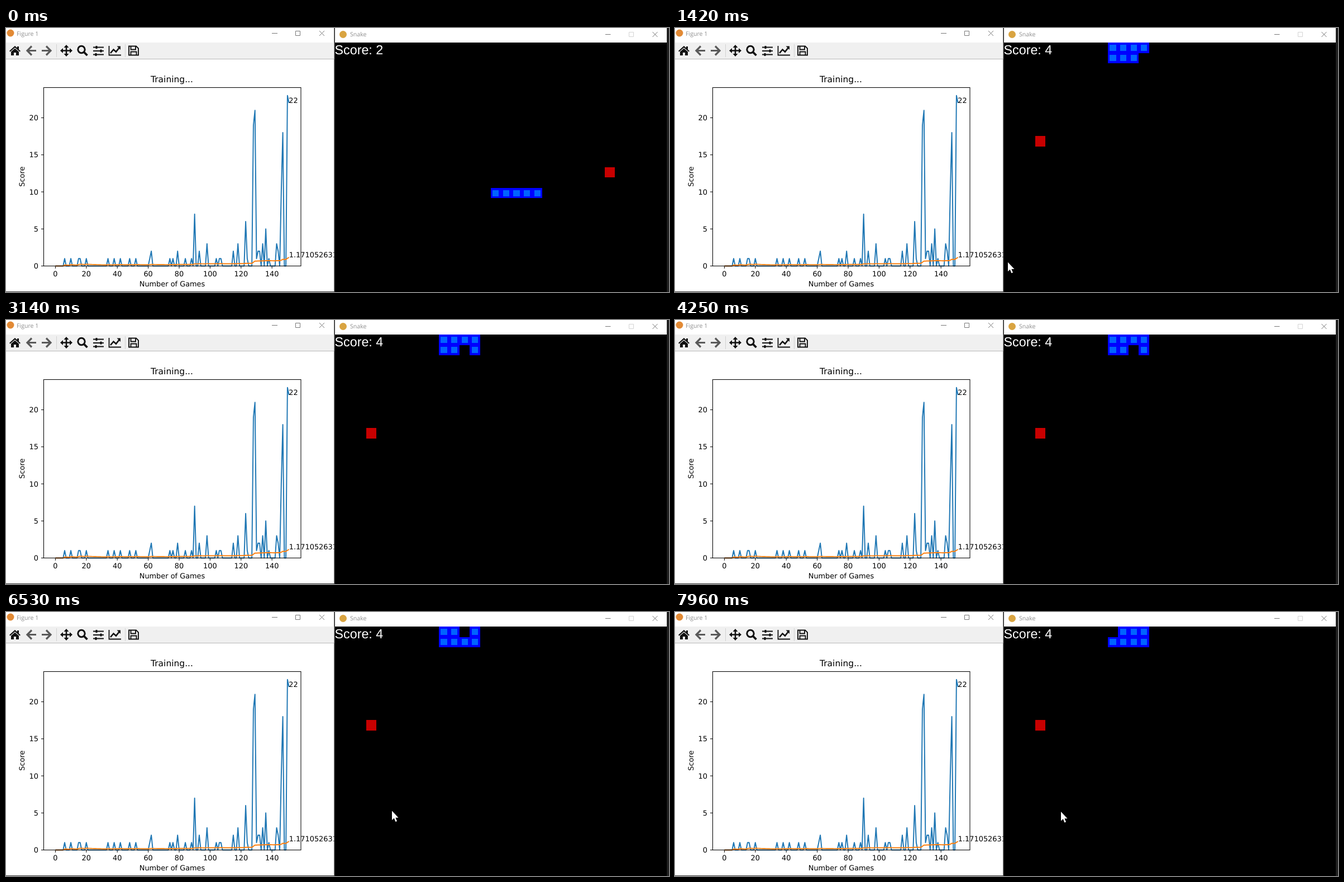
An HTML page for the animation above (7.99 s loop, 1187x472 px).

```html
<!DOCTYPE html>
<html lang="en">
<head>
<meta charset="utf-8">
<title>Snake training</title>
<style>
  html, body { margin: 0; width: 100%; height: 100%; overflow: hidden; background: #000; }
  svg { display: block; width: 1187px; height: 472px; }
  text { text-rendering: geometricPrecision; }
  .plot { font: 12.9px "DejaVu Sans", sans-serif; }
  .plot .title { font-size: 15.5px; }
  .bar { font: 10.6px "Open Sans", sans-serif; fill: #8f8f8f; }
  .score { font: 23.3px "Liberation Sans", Arial, sans-serif; fill: #fff; }
  .line { fill: none; stroke-width: 1.95; stroke-linejoin: round; }
  .axis { fill: none; stroke: #000; stroke-width: 1.04; }
  .button { fill: none; stroke: #777; }
  .icon { fill: none; stroke: #111; stroke-width: 2; }
  .mid { text-anchor: middle; }
  .end { text-anchor: end; }
</style>
</head>
<body>
<svg viewBox="0 0 1187 472">
  <!-- figure window -->
  <rect width="587.500" height="471" fill="#fff"/>
  <rect y="26" width="587.500" height="29" fill="#f0f0f0"/>
  <path d="M0 55.500H587.500" stroke="#b8b8b8"/>
  <path d="M0 471.500H588M588.300 0V472" stroke="#333"/>
  <circle cx="8" cy="9" r="6.500" fill="#e28a35"/>
  <text class="bar" x="19" y="13.700">Figure 1</text>
  <path class="button" d="M476 9.500h10M518.500 5.500h8v8h-8zM561 5l9 9m0-9l-9 9"/>

  <!-- toolbar -->
  <path d="M6 41L16 32L20 35.500V33H23V38.500L26 41L24.500 42.500L16 35L7.500 42.500ZM9 42.500L16 36.500L23 42.500V49H18V44H14V49H9Z" fill="#111"/>
  <g fill="none" stroke="#5a5a5a" stroke-width="3.200">
    <path d="M46 32.500L38 40.500L46 48.500M38.500 40.500H54"/>
    <path d="M72 32.500L80 40.500L72 48.500M79.500 40.500H64"/>
  </g>
  <path d="M90.500 29V52M213.500 29V52" stroke="#d2d2d2"/>
  <path class="icon" d="M108 33V48M100 40.500H116" style="stroke-width:2.6"/>
  <path d="M108 30l4.500 5h-9zM108 51l4.500-5h-9zM97 40.500l5-4.500v9zM119 40.500l-5-4.500v9z" fill="#111"/>
  <circle class="icon" cx="135" cy="38.500" r="6.200" style="stroke-width:3"/>
  <path class="icon" d="M139.500 43L145.500 49" style="stroke-width:3.8"/>
  <path class="icon" d="M156 34.500H175M156 41H175M156 47.500H175" style="stroke-width:1.8"/>
  <path class="icon" d="M162 32v5M170 38.500v5M161 45v5" style="stroke-width:3"/>
  <path class="icon" d="M184.500 32V48.500H206" style="stroke-width:1.8"/>
  <path class="icon" d="M187 45L192.500 38.500L197 42.500L203 35" style="stroke-width:2.6"/>
  <path d="M198.500 32.500H205V39z" fill="#111"/>
  <path class="icon" d="M220 32.500H233L237 36.500V48.500H220ZM223.500 33V38.500H232V33M223.500 48V42.500H233.500V48" style="stroke-width:1.9"/>

  <!-- chart -->
  <svg width="587.500" height="471">
    <g class="plot">
      <text class="title mid" x="297" y="97.200">Training...</text>
      <text class="mid" x="297.500" y="462.200">Number of Games</text>
      <text class="mid" transform="translate(33.300 265.700) rotate(-90)">Score</text>
      <g id="ticks"></g>
      <path id="scores" class="line" stroke="#1f77b4"/>
      <path id="means" class="line" stroke="#ff7f0e"/>
      <rect class="axis" x="67.500" y="106.500" width="460.500" height="319"/>
      <text x="506.300" y="133.700">22</text>
      <text x="506.800" y="409.800">1.1710526315789473</text>
    </g>
  </svg>

  <!-- game window -->
  <rect x="589" width="594" height="26" fill="#fff"/>
  <rect x="1183" width="4" height="472" fill="#202020"/>
  <circle cx="603.500" cy="11.500" r="6.500" fill="#d9a441"/>
  <text class="bar" x="616" y="15.200">Snake</text>
  <path class="button" d="M1073 11.500h9.500M1157.500 7l9 9m0-9l-9 9"/>
  <path class="button" d="M1115.500 7.500h8v8h-8z" style="stroke:#d4d4d4"/>
  <g shape-rendering="crispEdges">
    <path id="food" fill="#c80000"/>
    <path id="body" fill="#00f"/>
    <path id="inner" fill="#0064ff"/>
  </g>
  <text id="score" class="score" x="588.500" y="47.200"></text>
  <path id="cursor" d="M0 0V16.500L3.800 13L6.400 19.500L9 18.400L6.400 12.200H11.500Z" fill="#fff"/>
</svg>
<script>
const $ = id => document.getElementById(id);
const LOOP = 7990;

// ---- chart: single points recur at a few periods, the better games stand out
const GAMES = 152;
const periods = [[14, 6], [32, 10], [23, 15], [36, 16]];
const peaks = {
  62: 2, 79: 2, 90: 7, 93: 2, 98: 3, 115: 2, 118: 3, 123: 6, 128: 19, 129: 21,
  131: 2, 132: 2, 134: 3, 136: 5, 143: 3, 144: 2, 146: 10, 147: 18, 150: 23, 151: 22
};
const px = n => 88.4 + 2.77 * n;
const py = v => 425.5 - 13.25 * v;
const scores = [], means = [];
let sum = 0;
for (let n = 0; n < GAMES; n++) {
  const v = peaks[n] ?? +periods.some(([every, first]) => n % every === first);
  sum += v;
  scores.push([px(n), py(v)]);
  means.push([px(n), py(sum / (n + 1))]);
}
$('scores').setAttribute('d', 'M' + scores.join('L'));
$('means').setAttribute('d', 'M' + means.join('L'));

let ticks = '';
for (let n = 0; n <= 140; n += 20)
  ticks += `<path class="axis" d="M${px(n)} 425.5v4.5"/><text class="mid" x="${px(n)}" y="444.3">${n}</text>`;
for (let v = 0; v <= 20; v += 5)
  ticks += `<path class="axis" d="M67.5 ${py(v)}h-4.5"/><text class="end" x="58" y="${py(v) + 4.5}">${v}</text>`;
$('ticks').innerHTML = ticks;

// ---- snake: the trail of head cells; the body is its latest part
const CELL = 594.1 / 32;
const DIRS = { R: [1, 0], L: [-1, 0], U: [0, -1], D: [0, 1] };
const trail = [[15, 14]];
function walk(route) {
  for (const [, dir, count] of route.matchAll(/([RLUD])(\d+)/g))
    for (let i = 0; i < count; i++) {
      const [x, y] = trail[trail.length - 1];
      trail.push([x + DIRS[dir][0], y + DIRS[dir][1]]);
    }
}
walk('R4' + 'R7U2L15U10R2U1R2U1L2' + 'L3D1R3U1'.repeat(48));

const foods = [[26, 12], [11, 2], [3, 9]];
const eatenAt = [9, 34];

// [time, moves made]: close to 50 moves a second
const pace = [[0, 0], [840, 42.4], [2020, 103.9], [5390, 271.9], [LOOP, 406.5]];
// [time, x, y]: two visits from below the stage
const pointer = [
  [560, 602, 476], [780, 593, 418.5], [1640, 597, 419], [1900, 606, 476],
  [5900, 702, 476], [6400, 691, 355.5], [LOOP, 691, 357]
];

// Linear interpolation between keys, held before the first.
function at(keys, t) {
  let i = 0;
  while (i < keys.length - 2 && t >= keys[i + 1][0]) i++;
  const [t0, ...a] = keys[i], [t1, ...b] = keys[i + 1];
  const p = Math.max(0, (t - t0) / (t1 - t0));
  return a.map((v, k) => v + (b[k] - v) * p);
}

const square = (pad = 0) => ([x, y]) => {
  const s = CELL - 2 * pad;
  return `M${589.1 + x * CELL + pad} ${26 + y * CELL + pad}h${s}v${s}h${-s}z`;
};

function draw(now) {
  const t = now % LOOP;
  const moves = Math.floor(at(pace, t)[0]);
  const eaten = eatenAt.filter(m => moves >= m).length;
  const head = moves + 4;
  const cells = trail.slice(head - 4 - eaten, head + 1);
  $('body').setAttribute('d', cells.map(square()).join(''));
  $('inner').setAttribute('d', cells.map(square(CELL / 5)).join(''));
  $('food').setAttribute('d', square()(foods[eaten]));
  $('score').textContent = 'Score: ' + (2 + eaten);
  $('cursor').setAttribute('transform', `translate(${at(pointer, t)})`);
}

let start;
function frame(now) {
  start ??= now;
  draw(now - start);
  requestAnimationFrame(frame);
}
draw(0);
requestAnimationFrame(frame);
</script>
</body>
</html>
```
